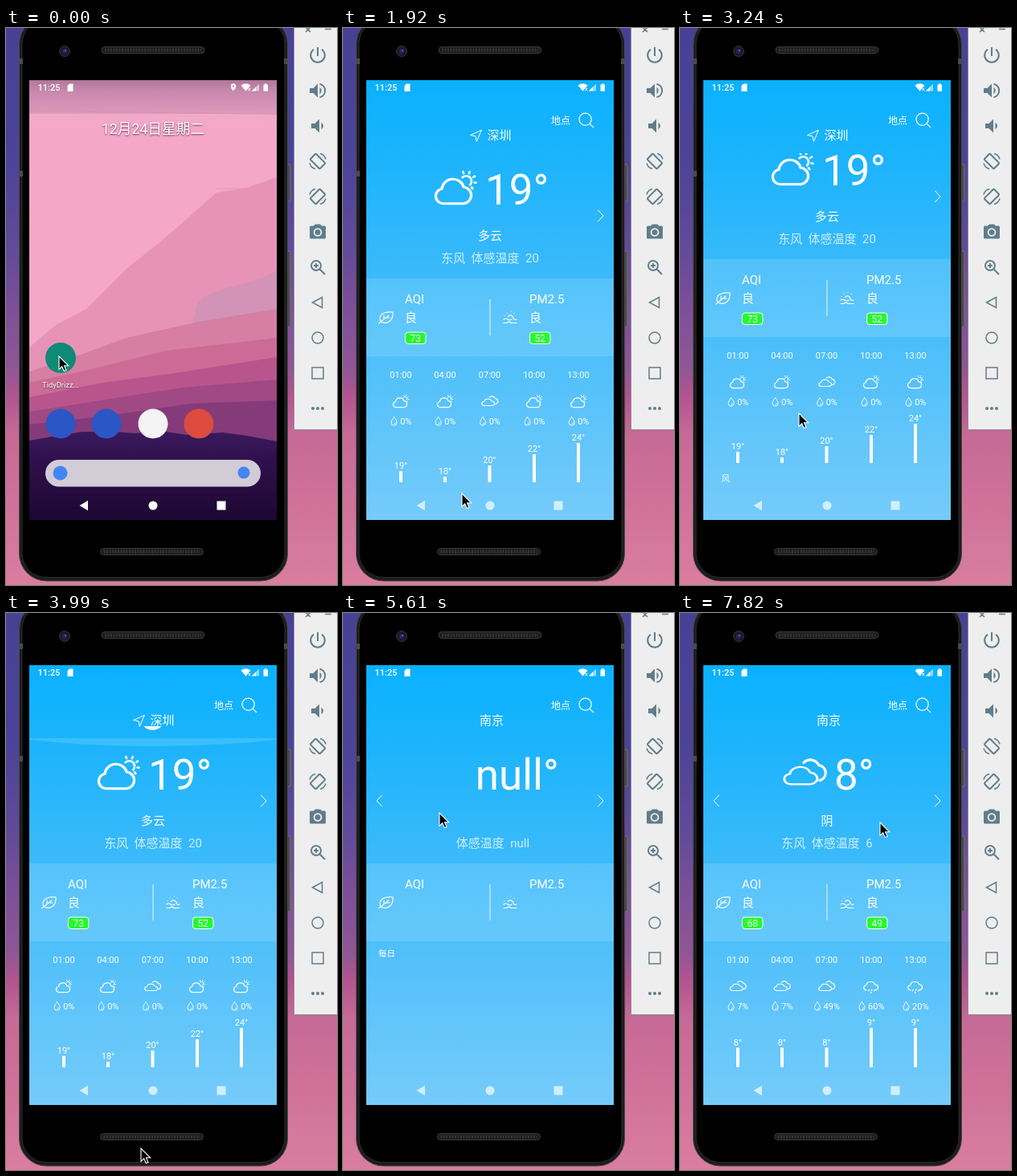
Animation of 412x694 px, one loop 8 s. Source, as an HTML page:

```html
<!DOCTYPE html>
<html lang="zh-CN">
<head>
<meta charset="utf-8">
<title>Weather app demo</title>
<style>
html, body { margin: 0; width: 100%; height: 100%; overflow: hidden; background: #c96d98; }
svg { display: block; width: 100%; height: 100%; }
text { font-family: Roboto, "Noto Sans CJK SC", "Noto Sans CJK", sans-serif; fill: #fff; white-space: pre; }
.line { fill: none; stroke: #fff; stroke-linecap: round; stroke-linejoin: round; }
.tool { fill: none; stroke: #607d8b; stroke-width: 2; }
.thin { stroke-width: 1.5; }
.solid { fill: #607d8b; stroke: none; }
.shade { text-shadow: 0 1px 2px rgba(60, 20, 60, .8); }
</style>
</head>
<body>
<svg id="stage" viewBox="0 0 412 694" preserveAspectRatio="none"></svg>
<script>
const COLS = [72, 127, 182.5, 238, 293];
const PAGE_W = 308;

const txt = (x, y, size, s, anchor = 'middle', more = '') =>
  `<text x="${x}" y="${y}" font-size="${size}" text-anchor="${anchor}" ${more}>${s}</text>`;
const rect = (x, y, w, h, fill, more = '') =>
  `<rect x="${x}" y="${y}" width="${w}" height="${h}" fill="${fill}" ${more}/>`;
const dot = (x, y, r, fill, more = '') => `<circle cx="${x}" cy="${y}" r="${r}" fill="${fill}" ${more}/>`;
const line = (d, w = 1.2, more = '') => `<path class="line" d="${d}" stroke-width="${w}" ${more}/>`;
const shape = (d, fill, more = '') => `<path d="${d}" fill="${fill}" ${more}/>`;
const at = (x, y, s, k = 1) => `<g transform="translate(${x} ${y}) scale(${k})">${s}</g>`;
const ramp = (id, y1, y2, stops) =>
  `<linearGradient id="${id}" gradientUnits="userSpaceOnUse" x1="0" x2="0" y1="${y1}" y2="${y2}">` +
  stops.map(([o, c, a = 1]) => `<stop offset="${o}" stop-color="${c}" stop-opacity="${a}"/>`).join('') +
  '</linearGradient>';

// Weather symbols, 20 units wide around the origin
const CLOUD = 'M-5.800 7.700a3.750 3.750 0 0 1-.4-7.400A5.300 5.300 0 0 1 4.200-.6A4.200 4.200 0 0 1 4.400 7.700';
const cloud = (x, y, kx, ky, close = 'z') =>
  `<g transform="translate(${x} ${y}) scale(${kx} ${ky})">${line(CLOUD + close, 1.25)}</g>`;
const rays = [-110, -70, -30, 10, 50].map(a => {
  const c = Math.cos(a * Math.PI / 180), s = Math.sin(a * Math.PI / 180);
  return `M${5.2 + 3.9 * c} ${-3.2 + 3.9 * s}L${5.2 + 4.7 * c} ${-3.2 + 4.7 * s}`;
}).join('');
const SKY = {
  sun: cloud(-.3, .2, 1, .96) + line('M3.300-4.900A2.500 2.500 0 1 1 7-1.400' + rays, 1),
  grey: cloud(-1.2, .3, .93, .68) + line('M-.4-4.800a4.400 4.400 0 0 1 7.200 1.200a3.700 3.700 0 0 1 .4 7.300'),
  rain: cloud(.3, -1.6, 1.04, .85, '') + line('M-2.600 4.500l-.6 1.300M1 4l-.6 1.300M4.200 4.700l-.6 1.300M0 7.400l-.5 1', 1.3),
  what: cloud(.4, -.6, 1.04, .92, '') + txt(0, 8, 10, '?')
};
const DROP = line('M0-5.200C2-2.400 3.500-.6 3.500 1.700a3.500 3.500 0 0 1-7 0C-3.500-.6-2-2.400 0-5.200zM1.600 2a1.800 1.800 0 0 1-1.400 1.600', .9);

const chance = (x, y, p) => {
  const w = String(p).length * 6.2 + 8;
  return at(x + 6.3 - w / 2 - 7.6, y, DROP) + txt(x + 6.3, y + 4, 11, p + '%');
};
const bar = (x, top, bottom) => rect(x - 2, top, 4, bottom - top, '#fff', 'rx=".8"');

function hourly(h) {
  const lo = Math.min(...h.temp), span = Math.max(...h.temp) - lo + 1;
  return COLS.map((x, i) => {
    const top = 566 - 49 * (h.temp[i] - lo + 1) / span;
    return txt(x, 436, 11, ['01:00', '04:00', '07:00', '10:00', '13:00'][i]) +
      at(x, 465, SKY[h.sky[i]]) + chance(x, 490, h.pop[i]) +
      txt(x, top - 3, 11, h.temp[i] + '°') + bar(x, top, 566);
  }).join('');
}

const DAYS = ['今天', '周三', '周四', '周五', '周六'];
const HIGH = [25, 26, 26, 22, 22], LOW = [18, 17, 14, 14, 15];
const DAY_SKY = [['grey', 'sun'], ['sun', 'sun'], ['sun', 'sun'], ['sun', 'grey'], ['grey', 'rain']];
const DAY_POP = [2, 2, 3, 7, 80];
const dayTitle = txt(44, 428, 10.5, '每日', 'start');

// Daily block, placed with its title at y 424
const daily = known => dayTitle + COLS.map((x, i) => {
  const top = 526 + (26 - HIGH[i]) * 5.35, end = 526 + (26 - LOW[i]) * 5.35;
  const [a, b] = known ? DAY_SKY[i] : ['what', 'what'];
  return txt(x, 451, 12, DAYS[i]) + at(x - 9.5, 466, SKY[a]) + at(x + 9, 488, SKY[b], b === 'rain' ? 1.12 : 1) +
    line(`M${x - 15} 494L${x + 16} 463`, 1) +
    (known ? chance(x, 506, DAY_POP[i]) : at(x - 1, 505, DROP)) +
    txt(x, top - 3.5, 11, HIGH[i] + '°') + bar(x, top, end) + txt(x, end + 12, 11, LOW[i] + '°');
}).join('');

const wind = txt(51.5, 589, 10.5, '风', 'start') + COLS.map(x =>
  txt(x - .5, 612.5, 12, '1-2级') + at(x - .5, 631, line('M-4 4L4-4M-2.800-4H4V2.800', 1.6))).join('');

const frame = (left, right) =>
  rect(29, 312, 308, 97, '#fff', 'opacity=".13"') +
  txt(77, 343, 15, 'AQI', 'start') + txt(232, 343, 15, 'PM2.5', 'start') +
  rect(182.5, 338, 1, 45, '#fff', 'opacity=".85"') +
  line('M47 366C43 357 51 353 62 354C63 364 56 370 47 366ZM44.500 368L57 358M51 362v-4M53 361h5', 1.1) +
  line('M200 367.500h4q2.500-2.500 5 0h7M200 363q2.500-2 5 0t5 0M205.500 359.500a3.600 3.600 0 0 1 6.500 2.500q1.500 2 4 1M204 355h.1M209 353h.1M213 355.500h.1M201 358.500h.1', 1.2) +
  (left ? line('M48.500 227L42 234L48.500 241', 1) : '') +
  (right ? line('M317.500 227L324 234L317.500 241', 1) : '');

const badge = (x, grade, n) => txt(x, 366, 15, grade, 'start') +
  rect(x + .5, 379, 25.5, 14.5, '#22fb2c', 'rx="3.5" stroke="#fff"') + txt(x + 13.3, 391, 12, n);
const soft = 'opacity=".76"';
const degrees = t => txt(216.7, 219.5, 53, t + '°');

const blank = days => degrees('null') + txt(186.5, 292, 15, '体感温度\u00a0 null', 'middle', soft) + days;
const report = p => at(p.temp > 9 ? 140 : 155, 199, SKY[p.sky], 2.6) + degrees(p.temp) +
  txt(183, 264, 15, p.name) +
  txt(183, 292, 15, `${p.wind}\u00a0 体感温度\u00a0 ${p.feel}`, 'middle', soft) +
  badge(77, p.grade, p.aqi) + badge(232, p.grade, p.pm) + hourly(p.hours);

const CITIES = [
  { city: '深圳', sky: 'sun', temp: 19, name: '多云', wind: '东风', feel: 20, grade: '良', aqi: 73, pm: 52,
    hours: { temp: [19, 18, 20, 22, 24], sky: ['sun', 'sun', 'grey', 'sun', 'sun'], pop: [0, 0, 0, 0, 0] } },
  { city: '南京', sky: 'grey', temp: 8, name: '阴', wind: '东风', feel: 6, grade: '良', aqi: 68, pm: 49,
    hours: { temp: [8, 8, 8, 9, 9], sky: ['grey', 'grey', 'grey', 'rain', 'rain'], pop: [7, 7, 49, 60, 20] } },
  { city: '上海', sky: 'grey', temp: 11, name: '阴', wind: '北风', feel: 10, grade: '优', aqi: 43, pm: 30,
    hours: { temp: [10, 10, 10, 11, 12], sky: ['sun', 'rain', 'rain', 'rain', 'rain'], pop: [63, 49, 49, 80, 25] } }
];

const pages = CITIES.map((p, i) => at(i * PAGE_W, 0,
  frame(i > 0, i < 2) +
  `<g id="blank${i}">${blank(i ? dayTitle : daily(false))}</g>` +
  `<g id="full${i}">${report(p)}${i ? '' : wind + at(0, 229, daily(true))}</g>`)).join('');

const navKeys = more => `<g fill="#fff" ${more}><path d="M91.500 595L102 588.800V601.200Z"/>` +
  '<circle cx="183" cy="595" r="5.500"/><rect x="262.500" y="589.500" width="11" height="11"/></g>';

const hill = (pts, fill) => shape(`M29 613V${pts}V613Z`, fill);
const wallpaper = rect(29, 65, 308, 548, 'url(#dusk)') +
  hill('398L62 370L100 350L150 300L190 268L225 238L262 205L300 199L337 186', '#e793b7') +
  line('M262 200H306', 1, 'style="stroke:#e793b7"') +
  shape('M232 368C240 345 233 338 262 328S310 318 337 302V380Z', '#d393b7') +
  hill('428L90 408L150 386L240 366L337 350', '#d67ea3') +
  hill('442L110 424L200 402L337 386', '#cc6c96') +
  hill('460L120 442L210 430L337 410', '#b9558d') +
  hill('478L130 462L220 448L337 438', '#a04984') +
  hill('494L120 484L230 468L337 464', '#853b7a') +
  hill('514L64 508L95 503L135 503L160 505L192 502L225 507L270 504L300 508L337 515', 'url(#night)');

const apps = rect(29, 65, 308, 42, 'url(#scrim)') +
  shape('M29 102L337 106V108L29 104Z', '#d78fb3', 'opacity=".6"') +
  txt(183, 132, 17.7, '12月24日星期二', 'middle', 'class="shade"') +
  dot(68, 411, 19, '#0e8a77') + txt(68, 448, 9.4, 'TidyDrizz...', 'middle', 'class="shade"') +
  dot(68, 493, 18.5, '#2a56c6') + dot(125, 493, 18.5, '#2a56c6') +
  dot(183, 493, 18.5, '#f4f4f4') + dot(240, 493, 18.5, '#dd4b3e') +
  rect(49, 538, 268, 33.5, '#d2ccd6', 'rx="16.75"') + dot(67.5, 554.5, 9, '#4285f4') + dot(296, 554, 7.5, '#4285f4');

const status = txt(39.5, 78, 11, '11:25', 'start', 'font-weight="500"') +
  shape('M79 69.500H83.500V79H76.500V72Z', '#fff') +
  '<g id="pin">' + shape('M283 78.500C280 75 279.800 74 279.800 72.500a3.200 3.200 0 0 1 6.400 0C286.200 74 286 75 283 78.500ZM283 71.300a1.200 1.200 0 1 0 .01 0Z', '#fff', 'fill-rule="evenodd"') + '</g>' +
  shape('M292.500 71.500Q298.500 67 304.500 71.500L301 75.500L298.500 78.800Z', '#fff') + line('M301.500 75l2.500 3m0-3l-2.500 3', 1) +
  shape('M315 69.500V78.500H306Z', '#fff', 'opacity=".55"') + shape('M311 73.500V78.500H306Z', '#fff') +
  shape('M320.500 70.500H322V69.300H324.500V70.500H326V78.800H320.500Z', '#fff');

const header = txt(259, 119.5, 12, '地点', 'start') +
  dot(301.6, 113.7, 7.6, 'none', 'stroke="#fff" stroke-width="1.2"') + line('M307.200 119.400L311.500 123.500', 1.2) +
  line('M172 127.500L158.500 133.500L165 134.800L166.300 141Z', 1, 'id="plane"') + txt(185, 139, 15, '', 'middle', 'id="city"');

const app = rect(29, 65, 308, 548, 'url(#sky)') +
  `<g clip-path="url(#body)"><g id="strip">${pages}</g>` +
  shape('M29 156H337V158Q183 174 29 158Z', '#fff', 'id="glow" opacity=".14"') + '</g>' + header +
  '<g clip-path="url(#pull)"><g id="spin">' + dot(0, 0, 15, '#fafafa') +
  line('M-5.600 0A5.600 5.600 0 1 1 0 5.600', 1.9, 'style="stroke:#333"') + '</g></g>' + navKeys('opacity=".68"');

// Emulator body and side toolbar
const speaker = (x, y) => rect(x, y, 128, 8, '#1c1c1c', 'rx="4" stroke="#3b3b3b"') +
  `<path d="M${x + 4} ${y + 4}h120" stroke="#343434" stroke-width="4" stroke-dasharray="2 1.5"/>`;
const sideKey = (y, h) => rect(350, y, 4, h, '#4a4a4a', 'rx="1.5" stroke="#858585" stroke-width=".7"');
const phone = sideKey(170, 46) + sideKey(278, 94) +
  rect(16.5, -14, 334, 703, '#1c1c1c', 'rx="34" stroke="#484848"') +
  rect(20, -10.5, 327, 695, '#000', 'rx="30" stroke="#2c2c2c"') +
  [[16, 38], [16, 178], [346, 38]].map(([x, y]) => rect(x, y, 5, 7, '#4a4a4a')).join('') +
  dot(73, 29, 6.5, '#1b1b22', 'stroke="#34343c"') + dot(73, 29, 3, '#29236b') + dot(74, 28, 1, '#6b66c0') +
  speaker(119, 23.5) + speaker(117.5, 648.5);

const tool = (d, cls = 'tool') => `<path class="${cls}" d="${d}"/>`;
const turn = rect(-8.5, -5, 17, 10, 'none', 'class="tool" rx="1.2" transform="rotate(45)"') +
  tool('M-10 2.500A10 10 0 0 0-3 9.500M3-9.500A10 10 0 0 1 10-2.500', 'tool thin');
const horn = tool('M0-3H4.500L10-8.500V8.500L4.500 3H0Z', 'solid');
const tools = [
  tool('M0-10V1M-5-7.300A8.800 8.800 0 1 0 5-7.300'),
  at(-10, 0, horn) + tool('M2.500-4.500Q7 0 2.500 4.500', 'solid') + tool('M2.500-8.300A8.500 8.500 0 0 1 2.500 8.300'),
  at(-8, 0, horn) + tool('M4.500-4.500Q9.500 0 4.500 4.500', 'solid'),
  turn,
  `<g transform="scale(-1 1)">${turn}</g>`,
  tool('M-3-9.500H3L5-7.500H8.500Q10-7.500 10-6V7Q10 8.500 8.500 8.500H-8.500Q-10 8.500-10 7V-6Q-10-7.500-8.500-7.500H-5Z', 'solid') +
    dot(0, .5, 4.4, 'none', 'stroke="#eee" stroke-width="1.8"'),
  dot(-2, -2, 6, 'none', 'class="tool"') + tool('M2.500 2.500L9 9M-5-2H1M-2-5V1'),
  tool('M-6.500 0L5.500-6.500V6.500Z', 'tool thin'),
  dot(0, 0, 7, 'none', 'class="tool thin"'),
  rect(-7, -7, 14, 14, 'none', 'class="tool thin"'),
  [-6, 0, 6].map(x => dot(x, 0, 2, '#607d8b')).join('')
].map((s, i) => at(388, 34 + 44 * i, s)).join('');
const toolbar = rect(358.5, -1, 56, 501.5, '#eee', 'stroke="#8d8a98"') + tools +
  tool('M373-1l6 6m0-6l-6 6M397 1.500h8', 'tool thin');

document.getElementById('stage').innerHTML = '<defs>' +
  ramp('desk', 0, 694, [[0, '#474196'], [.25, '#4d4397'], [.4, '#624b9a'], [.5, '#7c4f99'], [.61, '#8f5695'],
    [.66, '#b25490'], [.73, '#c66a96'], [.85, '#cf7199'], [1, '#d97e9f']]) +
  ramp('dusk', 65, 613, [[0, '#efafcf'], [.12, '#f4a7c7'], [1, '#f4a7c7']]) +
  ramp('night', 502, 613, [[0, '#3a1a5c'], [.35, '#2f104d'], [1, '#1d0731']]) +
  ramp('scrim', 65, 107, [[0, '#8a5078', .6], [.35, '#a0648c', .5], [.85, '#b4789c', .42], [1, '#b4789c', .3]]) +
  ramp('sky', 65, 613, [[0, '#0ab1fe'], [.2, '#1eb4fc'], [.45, '#3cbafa'], [1, '#75cbfa']]) +
  `<clipPath id="screen">${rect(29, 65, 308, 548, '#000')}</clipPath>` +
  `<clipPath id="body">${rect(29, 156, 308, 421, '#000')}</clipPath>` +
  `<clipPath id="pull">${rect(29, 141, 308, 436, '#000')}</clipPath>` +
  `<clipPath id="crop">${rect(29, 65, 308, 548, '#000', 'id="hole"')}</clipPath></defs>` +
  rect(0, 0, 412, 694, 'url(#desk)') + phone +
  `<g clip-path="url(#screen)">${wallpaper}<g id="apps">${apps}</g>${navKeys('')}` +
  `<g id="win" clip-path="url(#crop)"><g id="app">${app}</g></g>${status}</g>` + toolbar +
  '<path id="cursor" d="M0 0V16.300L3.700 12.800L6.300 18.600L9 17.400L6.500 11.800H11.700Z" stroke="#fff" stroke-width="1.100"/>';

const FULL = [29, 65, 308, 548];
// [ms, cursor x, cursor y, changed state]
const STEPS = [
  [0, 66, 409, { apps: 1, win: null, zoom: [1, 0, 0], page: 0, off: 0, scroll: 0, ready: [0, 0, 0], pin: 1, spin: null, glow: 0 }],
  [440, 66, 410, { apps: .85 }],
  [590, 66, 410, { apps: .4, win: [44, 350, 76, 110], zoom: [.42, 6, 250] }],
  [730, 66, 410, { apps: 0, win: [42, 205, 232, 320], zoom: [.76, 20, 110] }],
  [880, 66, 410, { win: [41, 119, 283.5, 463], zoom: [.922, 14.3, 38.9] }],
  [1030, 68, 410, { win: FULL, zoom: [1, 0, 0] }],
  [1170, 80, 406, { ready: [1, 0, 0] }],
  [1320, 105, 400, {}],
  [1470, 121, 396, { pin: 0 }],
  [1620, 138, 380, {}],
  [1920, 148, 580, {}],
  [2060, 147, 520, { scroll: 52 }],
  [2210, 145, 400, { scroll: 170 }],
  [2360, 142, 290, { scroll: 246 }],
  [2500, 141, 236, { scroll: 258 }],
  [2940, 141, 262, { scroll: 234 }],
  [3090, 144, 380, { scroll: 118 }],
  [3240, 148, 480, { scroll: 24 }],
  [3390, 152, 545, { scroll: 0 }],
  [3840, 162, 625, { glow: 1 }],
  [3990, 168, 667, { spin: [131, 0, 1] }],
  [4130, 168, 667, { spin: [160, 60, 1], glow: 0 }],
  [4280, 172, 630, { spin: [174, 150, 1] }],
  [4430, 190, 520, { spin: [174, 250, 1] }],
  [4580, 215, 390, { spin: [174, 350, 1] }],
  [4720, 240, 290, { spin: [174, 400, .5] }],
  [4870, 248, 252, { spin: null }],
  [5160, 228, 251, { off: 22 }],
  [5310, 165, 250, { off: 120 }],
  [5460, 120, 249, { off: 284, page: 1 }],
  [5610, 120, 249, { off: 308 }],
  [5760, 165, 254, { ready: [1, 1, 0] }],
  [5910, 235, 261, {}],
  [6200, 212, 261, { off: 334 }],
  [6350, 135, 260, { off: 440 }],
  [6490, 73, 258, { off: 590, page: 2 }],
  [6640, 73, 258, { off: 616 }],
  [6930, 73, 258, { ready: [1, 1, 1] }],
  [7230, 96, 258, { off: 592 }],
  [7380, 175, 260, { off: 505 }],
  [7530, 249, 261, { off: 380, page: 1 }],
  [7670, 249, 261, { off: 316 }],
  [7820, 249, 261, { off: 308 }]
];
let carry = {};
const states = STEPS.map(([t, x, y, s]) => (carry = { ...carry, ...s, t, x, y }));

const $ = id => document.getElementById(id);
const show = (id, on) => { $(id).style.display = on ? '' : 'none'; };
const move = (id, x, y, more = '') => $(id).setAttribute('transform', `translate(${x} ${y}) ${more}`);

function draw(s) {
  move('cursor', s.x, s.y);
  $('apps').setAttribute('opacity', s.apps);
  show('win', s.win);
  if (s.win) ['x', 'y', 'width', 'height'].forEach((k, i) => $('hole').setAttribute(k, s.win[i]));
  const [k, zx, zy] = s.zoom;
  move('app', zx, zy, `scale(${k})`);
  move('strip', -s.off, -s.scroll);
  CITIES.forEach((c, i) => { show('blank' + i, !s.ready[i]); show('full' + i, s.ready[i]); });
  $('city').textContent = CITIES[s.page].city;
  $('city').setAttribute('x', s.page ? 185 : 194.5);
  show('plane', !s.page);
  show('pin', s.pin);
  show('glow', s.glow);
  show('spin', s.spin);
  if (s.spin) move('spin', 182.5, s.spin[0], `rotate(${s.spin[1]}) scale(${s.spin[2]})`);
}

const start = performance.now();
let last = null;
function tick() {
  const t = (performance.now() - start) % 8000;
  const now = states.filter(s => s.t <= t).pop();
  if (now !== last) draw(last = now);
  requestAnimationFrame(tick);
}
tick();
</script>
</body>
</html>
```
